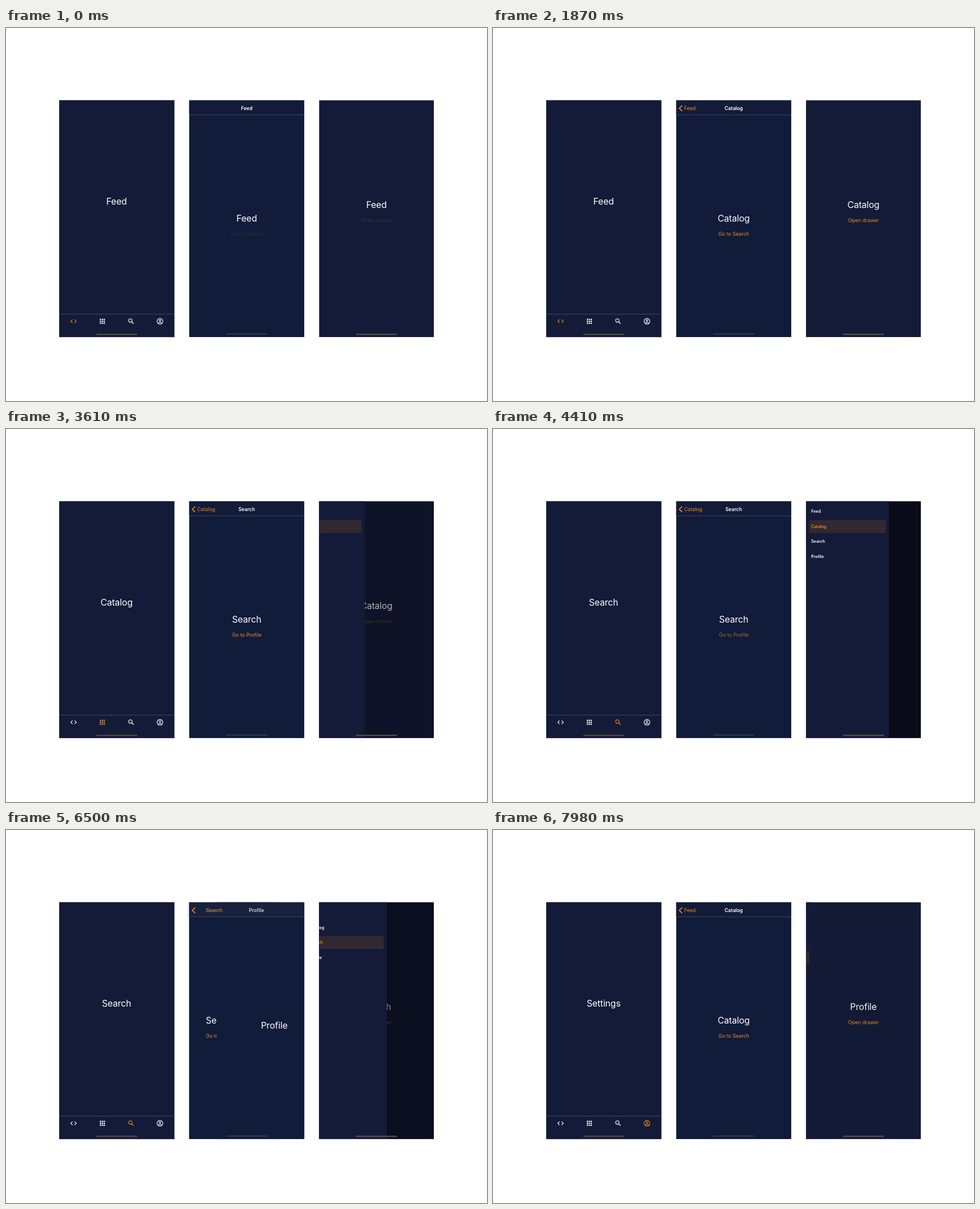
These frames come from a looping animation (850 by 659 pixels, 8000 ms). An HTML page:

```html
<!DOCTYPE html>
<html lang="en">
<head>
<meta charset="utf-8">
<title>Tabs, stack and drawer</title>
<style>
  html, body { margin: 0; width: 100%; height: 100%; overflow: hidden; background: #fff; }
  svg { display: block; width: 100%; height: 100%; }
  text { font-family: Inter, "Open Sans", sans-serif; fill: #fff; }
  .title { font-size: 15.8px; letter-spacing: -.12px; text-anchor: middle; }
  .link { font-size: 8.9px; text-anchor: middle; }
  .head { font-size: 8.65px; font-weight: 600; text-anchor: middle; }
  .back { font-size: 8.8px; }
  .item { font-size: 7.2px; font-weight: 600; }
  .link, .back { fill: #ee8a1d; }
</style>
</head>
<body>
<svg id="stage" viewBox="0 0 850 659" xmlns="http://www.w3.org/2000/svg">
  <defs>
    <clipPath id="stackClip"><rect x="323.5" y="127.5" width="203.7" height="418.7"/></clipPath>
    <clipPath id="drawerClip"><rect x="553.2" y="127.5" width="203" height="418.7"/></clipPath>
  </defs>
  <g id="tabs"></g>
  <g id="stack" clip-path="url(#stackClip)"></g>
  <g id="drawer" clip-path="url(#drawerClip)"></g>
</svg>
<script>
const LOOP = 8000, TOP = 127.5, HEIGHT = 418.7, WIDTH = 203.7;
const ORANGE = '#ee8a1d', NAVY = '#141b38', STACK_NAVY = '#111b3a';
const PAGES = ['Feed', 'Catalog', 'Search', 'Profile'];
const TABS = ['Feed', 'Catalog', 'Search', 'Settings'];

const TAB_TAPS = [2040, 4250, 7430];
const PUSHES = [250, 2380, 4520], POPS = [6450, 7480];
const LINK_PRESSES = [[-100, 150], [2260, 2400], [4400, 4540]];
const OPENS = [206, 3510, 6330], CLOSES = [1450, 5018, 7750];
const DRAWER_PRESSES = [[-100, 220], [3220, 3550], [6220, 6370]];

const $ = id => document.getElementById(id);
const clamp = v => Math.max(0, Math.min(1, v));
const total = (times, fn) => times.reduce((sum, at) => sum + fn(at), 0);

// Critically damped spring, stiffness 1000 and mass 3.
function spring(ms) {
  if (ms <= 0) return 0;
  if (ms > 450) return 1;
  const x = Math.sqrt(1000 / 3) * ms / 1000;
  return 1 - Math.exp(-x) * (1 + x);
}

function linkAlpha(t, presses) {
  return presses.reduce((a, [down, up]) =>
    Math.min(a, 1 - .83 * clamp((t - down) / 30) * (1 - clamp((t - up) / 300))), 1);
}

const rect = (x, y, w, h, fill, extra = '') =>
  `<rect x="${x}" y="${y}" width="${w}" height="${h}" fill="${fill}" ${extra}/>`;
const text = (cls, x, y, str, alpha = 1) =>
  `<text class="${cls}" x="${x}" y="${y}" opacity="${alpha}">${str}</text>`;
const homeBar = (x, y, fill) => rect(x, y, 72.5, 2.5, fill, 'rx="1.25"');

const ICONS = [
  c => `<path fill="none" stroke="${c}" stroke-width="2" d="M-3.3-5.3L-8.6 0l5.3 5.3M3.3-5.3L8.6 0 3.3 5.3"/>`,
  c => [-8, -2, 4].map(y => [-8, -2, 4].map(x => rect(x, y, 4, 4, c)).join('')).join(''),
  c => `<g fill="none" stroke="${c}" stroke-width="2"><circle cx="-2.5" cy="-2.5" r="5.5"/>
        <path stroke-width="2.3" d="M1.9 1.9L7.7 7.7"/></g>`,
  c => `<g fill="none" stroke="${c}" stroke-width="2"><circle r="9"/><circle cy="-2.5" r="2.7"/>
        <path d="M-6 6.2C-3.4 2.6 3.4 2.6 6 6.2"/></g>`
];

function drawTabs(t) {
  const active = TAB_TAPS.filter(at => t >= at).length;
  const icons = ICONS.map((icon, i) =>
    `<g transform="translate(${119.4 + 50.9 * i} 518.2) scale(.56)">${icon(i === active ? ORANGE : '#fff')}</g>`);
  $('tabs').innerHTML = rect(94, TOP, WIDTH, HEIGHT, NAVY) +
    rect(94, 505, WIDTH, .8, '#465069') +
    text('title', 195.4, 311.6, TABS[active]) + icons.join('') +
    homeBar(159.7, 539.9, '#4a4745');
}

function card(page, dx, alpha) {
  const last = page === PAGES.length - 1;
  return `<g transform="translate(${dx} 0)">` + rect(323.5, TOP, WIDTH, HEIGHT, STACK_NAVY) +
    text('title', 425.3, last ? 351.4 : 341.8, PAGES[page]) +
    (last ? '' : text('link', 425.6, 367.4, 'Go to ' + PAGES[page + 1], alpha)) + '</g>';
}

function drawStack(t) {
  const depth = total(PUSHES, at => spring(t - at)) - total(POPS, at => spring(t - at));
  const low = Math.floor(depth + 1e-6), part = clamp(depth - low);
  const moving = part > 1e-4;
  const q = clamp(part * 1.03);
  const alpha = linkAlpha(t, LINK_PRESSES);
  let out = card(low, -.3 * WIDTH * part, alpha);
  if (moving) out += card(low + 1, WIDTH * (1 - part), 1);

  out += rect(323.5, TOP, WIDTH, 25.7, moving ? '#18213d' : '#121c39') +
    rect(323.5, 152.9, WIDTH, .8, '#465069') +
    text('head', 425.4 - 75 * q, 145.1, PAGES[low], 1 - q);
  if (moving) {
    out += text('head', 425.4 + 80 * (1 - q), 145.1, PAGES[low + 1], q) +
      text('back', 337.7 + 75 * (1 - q), 145.1, PAGES[low], q);
  }
  if (low > 0) out += text('back', 337.7 - 60 * q, 145.1, PAGES[low - 1], 1 - q);
  out += `<path d="M334.3 136.9L329.2 141.9l5.1 5" fill="none" stroke="${ORANGE}"
    stroke-width="1.6" opacity="${low > 0 ? 1 : q}"/>`;
  $('stack').innerHTML = out + homeBar(389.2, 539.4, '#323445');
}

function drawDrawer(t) {
  const page = CLOSES.filter(at => t >= at).length;
  const open = clamp(total(OPENS, at => spring(t - at)) - total(CLOSES, at => spring(t - at)));
  let out = rect(553.2, TOP, 203, HEIGHT, NAVY) +
    text('title', 654.6, 318, PAGES[page]) +
    text('link', 654.8, 343.4, 'Open drawer', linkAlpha(t, DRAWER_PRESSES));
  if (open > 0) {
    out += rect(553.2, TOP, 203, HEIGHT, '#000', `opacity="${.57 * open}"`) +
      `<g transform="translate(${-146.4 * (1 - open)} 0)">` +
      rect(553.2, TOP, 146.4, HEIGHT, NAVY) +
      rect(558.5, 134.3 + 26.6 * page, 135.6, 22.8, '#312931', 'rx="2.5"') +
      PAGES.map((name, i) => `<text class="item" x="562.2" y="${148.2 + 26.6 * i}"
        style="fill:${i === page ? ORANGE : '#fff'}">${name}</text>`).join('') + '</g>';
  }
  $('drawer').innerHTML = out + homeBar(618.7, 539.9, '#4f4b4a');
}

function render(t) {
  drawTabs(t);
  drawStack(t);
  drawDrawer(t);
}

const start = performance.now();
function tick() {
  render((performance.now() - start) % LOOP);
  requestAnimationFrame(tick);
}
render(0);
requestAnimationFrame(tick);
</script>
</body>
</html>
```
